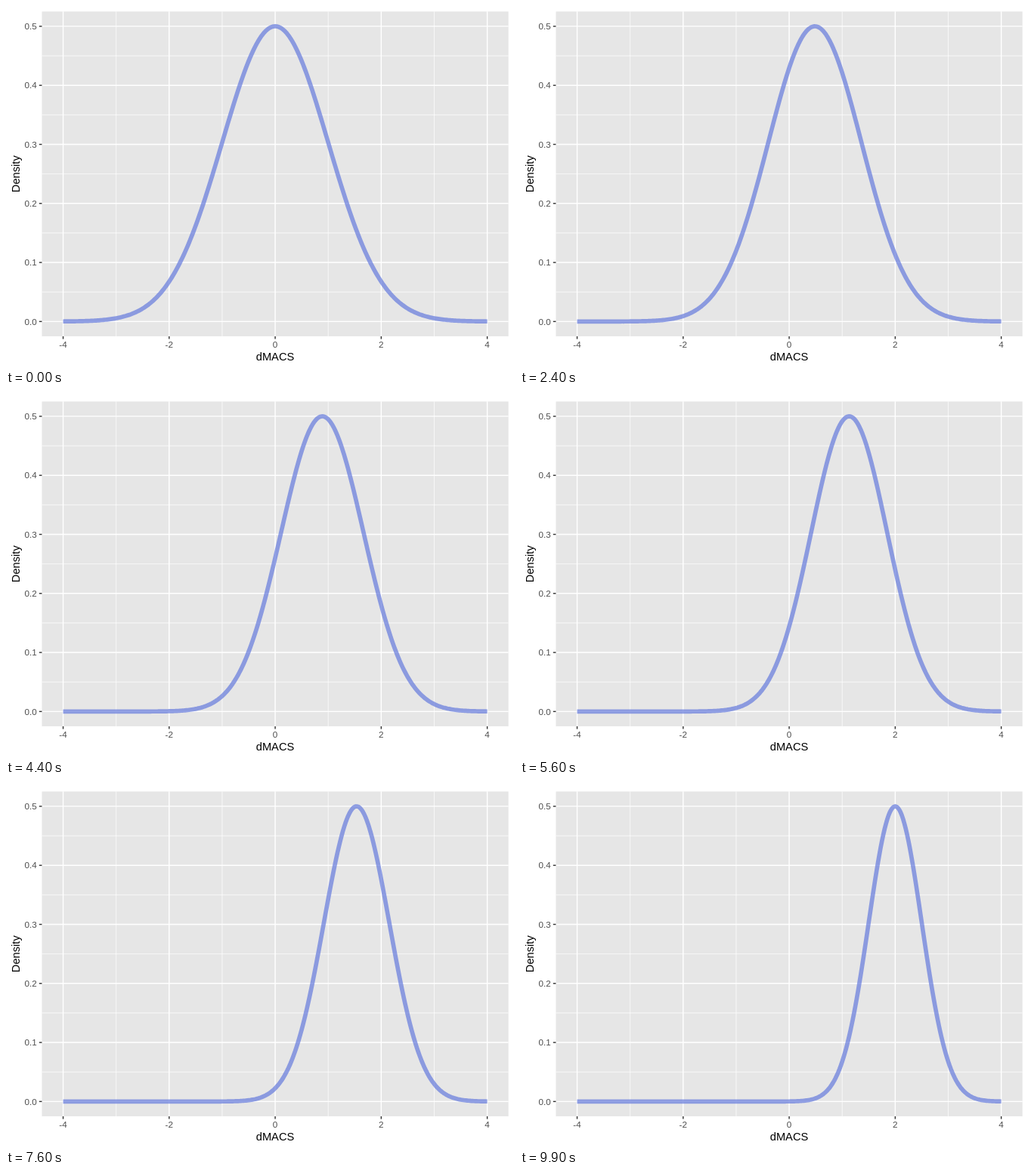
Write an HTML page that moves like this. It is 672 by 480 pixels and loops after 10000 ms.

```html
<!DOCTYPE html>
<html lang="en">
<head>
<meta charset="utf-8">
<title>Density curve</title>
<style>
  html, body { margin: 0; width: 100%; height: 100%; overflow: hidden; background: #fff; }
  svg { display: block; width: 672px; height: 480px; font-family: "Liberation Sans", Arial, Helvetica, sans-serif; }
  .minor { stroke: #fff; stroke-width: 0.71; }
  .major { stroke: #fff; stroke-width: 1.42; }
  .tick { stroke: #333; stroke-width: 1.42; }
  .label { fill: #4d4d4d; font-size: 11.73px; }
  .title { fill: #000; font-size: 14.67px; text-anchor: middle; }
  #curve { fill: none; stroke: rgba(101, 123, 221, 0.7); stroke-width: 5.69; stroke-linejoin: round; }
</style>
</head>
<body>
<svg viewBox="0 0 672 480">
  <rect x="47.5" y="7.33" width="617.17" height="430.6" fill="#e6e6e6"/>
  <g id="grid"></g>
  <path id="curve"/>
  <g id="axes"></g>
  <text class="title" x="356" y="470">dMACS</text>
  <text class="title" transform="translate(17.8 222.7) rotate(-90)">Density</text>
</svg>
<script>
const panel = { left: 47.5, right: 664.67, top: 7.33, bottom: 437.93 };
const px = x => 356.08 + x * 70.13;
const py = d => 418.36 - d * 782.9;

const FRAMES = 100, STEP = 100;
const grid = document.getElementById("grid");
const axes = document.getElementById("axes");
const curve = document.getElementById("curve");

function add(parent, tag, attrs, text) {
  const el = document.createElementNS("http://www.w3.org/2000/svg", tag);
  for (const key in attrs) el.setAttribute(key, attrs[key]);
  if (text !== undefined) el.textContent = text;
  parent.appendChild(el);
}

function line(parent, cls, x1, y1, x2, y2) {
  add(parent, "line", { class: cls, x1, y1, x2, y2 });
}

const vertical = (cls, x) => line(grid, cls, px(x), panel.top, px(x), panel.bottom);
const horizontal = (cls, d) => line(grid, cls, panel.left, py(d), panel.right, py(d));

for (let d = 0.05; d < 0.5; d += 0.1) horizontal("minor", d);
for (let x = -3; x <= 3; x += 2) vertical("minor", x);

for (let i = 0; i <= 5; i++) {
  const y = py(i / 10);
  horizontal("major", i / 10);
  line(axes, "tick", panel.left - 3.67, y, panel.left, y);
  add(axes, "text", { class: "label", x: 40.9, y: y + 4.2, "text-anchor": "end" }, (i / 10).toFixed(1));
}
for (let x = -4; x <= 4; x += 2) {
  vertical("major", x);
  line(axes, "tick", px(x), panel.bottom, px(x), panel.bottom + 3.67);
  add(axes, "text", { class: "label", x: px(x), y: 453, "text-anchor": "middle" }, x);
}

// A bell of fixed height whose mean goes 0 to 2 while its spread goes 1 to 0.5.
function bell(p) {
  const mean = 2 * p, sd = 1 - 0.5 * p;
  const points = [];
  for (let i = 0; i <= 320; i++) {
    const x = -4 + i / 40;
    const d = 0.5 * Math.exp(-0.5 * ((x - mean) / sd) ** 2);
    points.push(px(x).toFixed(2) + " " + py(d).toFixed(2));
  }
  return "M" + points.join("L");
}

let shown = -1;
const start = performance.now();

function draw(now) {
  const frame = Math.floor(Math.max(0, now - start) / STEP) % FRAMES;
  if (frame !== shown) {
    curve.setAttribute("d", bell(frame / (FRAMES - 1)));
    shown = frame;
  }
  requestAnimationFrame(draw);
}
draw(start);
</script>
</body>
</html>
```
